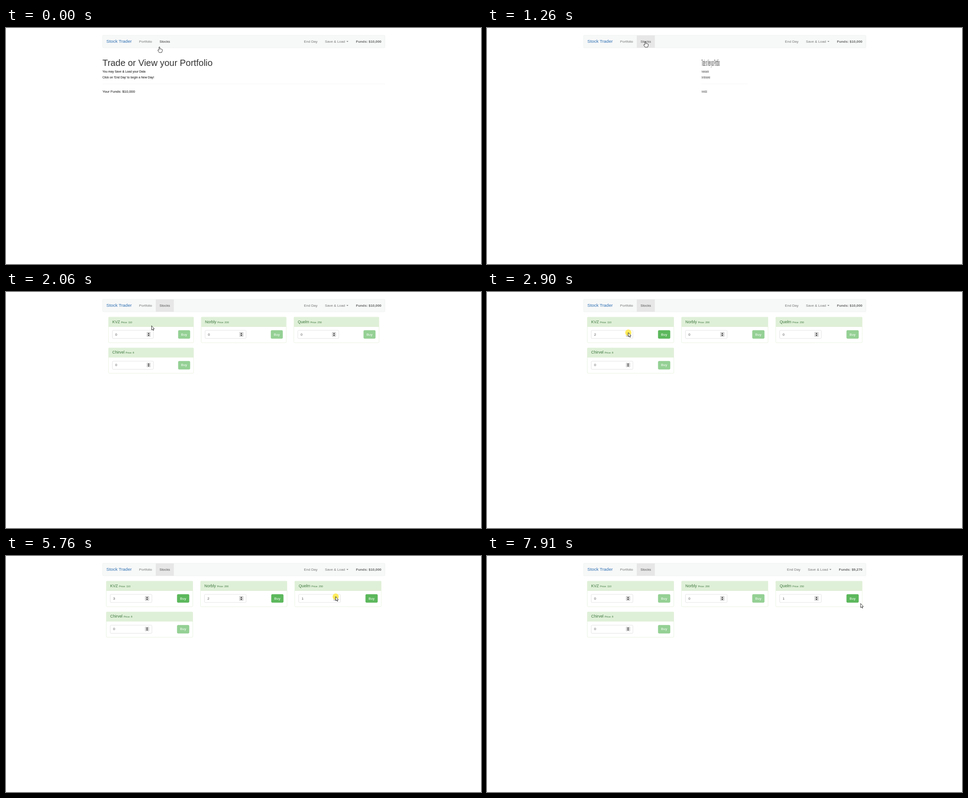
Animation, 1059 px wide and 529 px high, one loop 7990 ms. Source, as an HTML page:

```html
<!DOCTYPE html>
<html lang="en">
<head>
<meta charset="utf-8">
<title>Stock Trader</title>
<style>
  * { box-sizing: border-box; }
  html, body { margin: 0; width: 100%; height: 100%; overflow: hidden; background: #fff; }
  #page {
    --line: 1.8px solid;
    position: absolute; left: 215px; top: 0; width: 1140px;
    transform: scale(.5528); transform-origin: 0 0;
    font: 14.2px/20px "Liberation Sans", Arial, sans-serif; color: #333;
  }
  nav {
    position: absolute; top: 29px; width: 1140px; height: 52px; display: flex;
    background: #f7f8f8; border: var(--line) #e7eaea; border-radius: 4px; color: #777;
  }
  nav span, nav b { padding: 14.2px 15px; white-space: nowrap; }
  nav .brand { font-size: 18px; color: #2a6db0; }
  nav .gap { flex: 1; }
  nav b { padding-right: 14px; color: #666; }
  nav i { display: inline-block; margin-left: 6px; vertical-align: middle; border: 4px solid transparent; border-top-color: #777; border-bottom: 0; }
  #stocks { color: #333; }
  #stocks.active { color: #555; background: #e7e7e7; }
  #home, #cards { position: absolute; top: 101px; width: 1140px; }
  h1, h6 { font-weight: 400; line-height: 1.1; }
  h1 { font-size: 36px; margin: 20px 0 10px; }
  h6 { font-size: 12px; margin: 10px 0; }
  h6, p { -webkit-text-stroke: .25px; }
  hr { margin: 20px 0; border: 0; border-top: var(--line) #eee; }
  p { margin: 0; }
  .card { position: absolute; width: 350px; height: 104.6px; border: var(--line) #d6e9c6; border-radius: 4px; background: #fff; }
  .title { height: 38.6px; padding: 9.5px 15px; font-size: 16px; line-height: 17.6px; color: #3c763d; background: #dff0d8; border-bottom: var(--line) #d6e9c6; }
  .title small { font-size: 65%; }
  .field, .buy { position: absolute; top: 53.4px; height: 34px; padding: 5.2px 11.2px; border: var(--line) #ccc; border-radius: 4px; }
  .field { left: 14.6px; width: 169px; color: #555; }
  .field svg { position: absolute; right: 11.2px; top: 6.2px; }
  .buy { right: 14.6px; color: #fff; background: #5cb85c; border-color: #4cae4c; }
  .buy.off { opacity: .65; }
  .buy.hover { background: #449d44; border-color: #398439; }
  #pointer { position: absolute; left: 0; top: 0; width: 24px; height: 24px; overflow: visible; }
  #pointer path { fill: #fff; stroke: #222; stroke-width: .9; stroke-linejoin: round; }
</style>
</head>
<body>
<div id="page">
  <nav>
    <span class="brand">Stock Trader</span><span>Portfolio</span><span id="stocks">Stocks</span>
    <span class="gap"></span>
    <span>End Day</span><span>Save &amp; Load<i></i></span><b id="funds"></b>
  </nav>
  <div id="home">
    <h1>Trade or View your Portfolio</h1>
    <h6>You may Save &amp; Load your Data</h6>
    <h6>Click on 'End Day' to begin a New Day!</h6>
    <hr>
    <p>Your Funds: $10,000</p>
  </div>
  <div id="cards"></div>
</div>
<svg id="pointer">
  <circle id="glow" r="6.9" fill="#ffe838" fill-opacity=".8"/>
  <path id="shape"/>
</svg>
<script>
const LOOP = 7990, FLIP = 1000, LEAVE = 325, ENTER = 1341;
const MOVE = 600, HOLD = 80;
const CARD_LEFT = 223.5, CARD_STEP = 210;
const $ = id => document.getElementById(id);

const stocks = [
  { name: 'KVZ', price: 110 }, { name: 'Norbly', price: 200 },
  { name: 'Quelm', price: 250 }, { name: 'Chirvel', price: 8 }
];

// Pointer actions: when to set off, where to, and when to press there
const goTo = (go, x, y) => ({ go, x, y, press: Infinity });
const spin = (go, press, stock) => ({ go, press, stock, kind: 'spin', x: 315 + CARD_STEP * stock, y: 91 });
const buy = (go, press, stock) => ({ go, press, stock, kind: 'buy', x: 392 + CARD_STEP * stock, y: 94 });
const actions = [
  { go: 70, press: 230, x: 353, y: 30 },
  spin(1840, 2520, 0), spin(2600, 2900, 0), spin(3000, 3210, 0),
  spin(3330, 4320, 1), spin(4400, 4560, 1),
  spin(4700, 5760, 2),
  buy(5860, 6400, 1), buy(6500, 7420, 0),
  goTo(7500, 867, 113), goTo(7780, 831, 106)
];

const shapes = {
  arrow: 'M0 0V9.4L2.1 7.5 3.5 10.6 4.9 10 3.6 7H6.2Z',
  hand: 'M-1 8V1Q0-.6 1 1V5Q2.2 4 3 5.3 4.2 4.5 4.8 5.7 6.4 5.2 6.6 6.8L6.2 10 5 13H-.5L-3.5 8.5Q-4 7-2.5 7Z',
  beam: 'M-1.8-4.5H1.8M0-4.5V4M-1.8 4H1.8'
};

$('cards').innerHTML = stocks.map(({ name, price }, i) => `
  <div class="card" style="left:${15.3 + i % 3 * 380}px;top:${Math.floor(i / 3) * 124.6}px">
    <div class="title">${name} <small>Price: ${price}</small></div>
    <div class="field"><span class="count"></span>
      <svg width="16" height="18"><path d="M.9.9h14.2v16.2H.9z" fill="#f1f1f1" stroke="#aaa" stroke-width="1.6"/>
      <path d="M3.5 7.5l4.5-5 4.5 5zM3.5 10.5l4.5 5 4.5-5z" fill="#222"/></svg></div>
    <div class="buy">Buy</div>
  </div>`).join('');
const counts = document.querySelectorAll('.count');
const buttons = document.querySelectorAll('.buy');

function accountAt(t) {
  const quantity = stocks.map(() => 0);
  let funds = 10000;
  for (const { kind, press, stock } of actions) {
    if (kind === 'spin' && t >= press) quantity[stock]++;
    if (kind === 'buy' && t >= press + HOLD) {
      funds -= quantity[stock] * stocks[stock].price;
      quantity[stock] = 0;
    }
  }
  return { quantity, funds };
}

function pointerAt(t) {
  let x = 342, y = 42;
  actions.forEach((action, i) => {
    if (t < action.go) return;
    const next = actions[i + 1] ? actions[i + 1].go : LOOP;
    const k = Math.min(1, (t - action.go) / Math.min(MOVE, next - action.go));
    const eased = 1 - (1 - k) ** 3;
    x += (action.x - x) * eased;
    y += (action.y - y) * eased;
  });
  return [x, y];
}

// cubic-bezier(x1, 0, x2, 1)
function ease(x, x1, x2) {
  if (x <= 0) return 0;
  if (x >= 1) return 1;
  let lo = 0, hi = 1, s;
  for (let i = 0; i < 24; i++) {
    s = (lo + hi) / 2;
    const at = 3 * x1 * s * (1 - s) ** 2 + 3 * x2 * s * s * (1 - s) + s ** 3;
    if (at < x) lo = s; else hi = s;
  }
  return s * s * (3 - 2 * s);
}

function turn(el, amount) {
  el.style.transform = amount ? `scaleX(${Math.cos(amount * Math.PI / 2)})` : 'none';
}

function draw(t) {
  const entered = t >= ENTER;
  $('stocks').classList.toggle('active', t >= LEAVE);
  $('home').style.display = entered ? 'none' : 'block';
  $('cards').style.display = entered ? 'block' : 'none';
  // ease-in, then ease-out
  turn($('home'), ease((t - LEAVE) / FLIP, .42, 1));
  turn($('cards'), 1 - ease((t - ENTER) / FLIP, 0, .58));

  const { quantity, funds } = accountAt(t);
  $('funds').textContent = 'Funds: $' + funds.toLocaleString('en-US');

  const [x, y] = pointerAt(t);
  const inRow = entered && y > 86 && y < 105 && x < 837;
  const column = Math.floor((x - CARD_LEFT) / CARD_STEP);
  const inside = x - CARD_LEFT - column * CARD_STEP;
  const onField = inRow && inside > 9 && inside < 86;
  const onButton = inRow && inside > 156 && inside < 185 && quantity[column] > 0;
  quantity.forEach((value, i) => {
    counts[i].textContent = value;
    buttons[i].classList.toggle('off', !value);
    buttons[i].classList.toggle('hover', onButton && i === column);
  });

  const kind = y < 45 || onButton ? 'hand' : onField ? 'beam' : 'arrow';
  $('shape').setAttribute('d', shapes[kind]);
  $('glow').style.display = actions.some(a => t >= a.press && t < a.press + HOLD) ? '' : 'none';
  $('pointer').style.transform = `translate(${x}px, ${y}px)`;
}

const start = performance.now();
function tick() {
  draw((performance.now() - start) % LOOP);
  requestAnimationFrame(tick);
}
tick();
</script>
</body>
</html>
```
